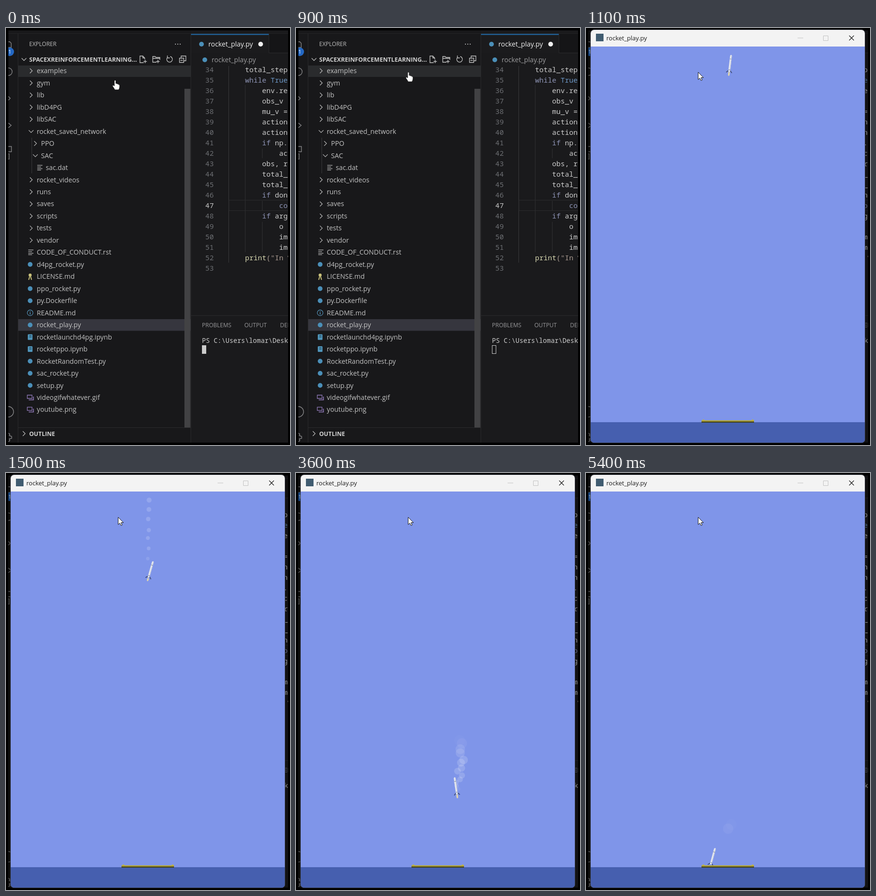
An HTML page that plays this animation: 600 by 878 pixels, repeating every 5500 ms.

```html
<!DOCTYPE html>
<html lang="en">
<head>
<meta charset="utf-8">
<title>Rocket landing</title>
<style>
html, body { margin: 0; width: 100%; height: 100%; overflow: hidden; background: #000; }
svg { display: block; width: 600px; height: 878px; }
text { font-family: "Open Sans", "Noto Sans", sans-serif; white-space: pre; }
.mono { font-family: "Noto Sans Mono", "DejaVu Sans Mono", monospace; }
</style>
</head>
<body>
<svg viewBox="0 0 600 878" xmlns="http://www.w3.org/2000/svg">
  <defs>
    <clipPath id="stage"><rect x="5" y="5" width="591" height="868"/></clipPath>
    <clipPath id="frame"><rect x="10" y="4" width="579" height="869" rx="7"/></clipPath>
  </defs>
  <rect width="600" height="878" fill="#000"/>
  <g id="ide" clip-path="url(#stage)"></g>
  <rect id="shade" x="5" y="5" width="591" height="868" fill="#000" opacity=".3"/>
  <g id="win">
    <rect x="9.5" y="3.5" width="580" height="870" rx="7" fill="none" stroke="#33363f"/>
    <g clip-path="url(#frame)">
      <rect id="bar" x="10" y="4" width="579" height="35.5" fill="#f3f3f3"/>
      <rect id="sky" x="10" y="39" width="579" height="834"/>
      <g id="scene">
        <rect x="10" y="830" width="579" height="43" fill="#465faf"/>
        <g id="puffs" fill="#fff"></g>
        <g id="rocket">
          <ellipse id="flame" cy="4.5" rx="1.8" ry="4" fill="#ecdca6"/>
          <path d="M-2-2L-6 2M2-2L6 2M-4-1H4" stroke="#3a4874" stroke-width="1.6" fill="none"/>
          <path d="M-2 0V-34L0-36L2-34V0Z" fill="#e3e6ee"/>
          <path d="M1.5-1V-34" stroke="#b9c1d8"/>
          <path d="M-2-4H2M-2-27H2" stroke="#7a84a0"/>
        </g>
        <rect x="244" y="826" width="111" height="3" fill="#b5a83a"/>
        <rect x="244" y="828.5" width="111" height="2.5" fill="#45441f"/>
        <path d="M245 826l3-2l3 2zM349 826l3-2l3 2z" fill="#c4b63c"/>
      </g>
    </g>
    <rect x="21" y="12" width="16" height="16" fill="#405c70"/>
    <text x="43" y="26" font-size="13.05" fill="#1c1c1c">rocket_play.py</text>
    <g fill="none">
      <path d="M447 21h12M501.500 16.500h10v10h-10z" stroke="#c2c2c2"/>
      <path d="M556 16l10 10M566 16l-10 10" stroke="#222" stroke-width="1.4"/>
    </g>
  </g>
  <path id="hand" d="M4 1.500Q4 0 5.500 0T7 1.500V7Q9 6 10 8Q12 7 12.500 9Q15 8.500 15 11V14Q15 17 13 20H5Q3 16 .5 13Q-.5 11 1.500 10.500L4 12Z" fill="#fff" stroke="#222" stroke-width=".8"/>
  <path id="arrow" d="M237 93V108.500L240.500 105.500L243 110.500L245.500 109.500L243 104.500H248Z" fill="#fff" stroke="#111"/>
</svg>
<script>
const $ = id => document.getElementById(id);
const ide = $("ide");

function add(parent, tag, attrs, text) {
  const el = document.createElementNS("http://www.w3.org/2000/svg", tag);
  for (const k in attrs) el.setAttribute(k, attrs[k]);
  if (text !== undefined) el.textContent = text;
  return parent.appendChild(el);
}
const box = (x, y, width, height, fill) => add(ide, "rect", { x, y, width, height, fill });
const dot = (cx, cy, r, fill) => add(ide, "circle", { cx, cy, r, fill });
const line = (d, stroke, w = 1) => add(ide, "path", { d, stroke, "stroke-width": w, fill: "none" });
const label = (x, y, s, size, fill, weight = 400) =>
  add(ide, "text", { x, y, "font-size": size, fill, "font-weight": weight }, s);
const mono = (x, y, s, size, fill) =>
  add(ide, "text", { x, y, "font-size": size, fill, class: "mono" }, s);
const chevron = (x, y, open) =>
  line(open ? `M${x - 5} ${y - 2.5}l5 5l5-5` : `M${x - 2.5} ${y - 5}l5 5l-5 5`, "#b8b8b8", 1.3);

// Panels
box(5, 5, 591, 868, "#18181a");
box(391, 5, 205, 868, "#1a1a1c");
box(391, 12, 205, 40, "#151517");
box(391, 12, 164, 41, "#1b1b1d");
line("M391 13.500H555", "#226fb0", 2);
line("M25.500 12V873M390.500 12V873M555.500 12V52M555 52.500H596M391 605.500H596M26 841.500H390", "#2b2b2d");
line("M5 11.500H596", "#242426");

// Activity bar
line("M5 29h3l3 3v9H5M5 84a8 8 0 0 1 0 16M5 144l4 4l-4 4M5 200l6 5l-6 5M5 249.500h6.500v11H5M5 265h1.500v11H5M5 797a11 11 0 0 1 0 22", "#858587", 1.4);
line("M5 853l3 2l-1 3l5 2v4l-5 1l1 4l-3 2", "#858587", 1.4);
dot(8, 50, 9, "#2468c4");
label(5, 54, "1", 10.5, "#fff");

// Explorer header
label(49, 38, "EXPLORER", 12, "#bdbdbd");
for (const x of [358, 363, 368]) dot(x, 34, 1.1, "#c8c8c8");

const hover = box(26, 79, 364, 24, "#2a2b2d");
box(26, 613, 364, 24.500, "#36363e");
box(377, 128, 12.500, 713, "#424244");
chevron(38, 66, true);
const title = label(49, 71, "", 12.56, "#cfcfcf", 700);
const tools = line("M291 73h-8V59h6l4 4v3M289 59v4h4M294 67v7M290.500 70.500h7" +
  "M318 72h-8V60h5l2 2h8v5M310 64h15M321 67v7M317.500 70.500h7" +
  "M341 62a6 6 0 1 0 6-2M341 58v5h5" +
  "M370 63v-4h10v10h-4M366.500 63.500h9v9h-9zM368.500 68h5", "#c8c8c8", 1.3);

// File tree: kind + name
const files = [
  ">examples", ">gym", ">lib", ">libD4PG", ">libSAC", "vrocket_saved_network", ">PPO", "vSAC", "=sac.dat",
  ">rocket_videos", ">runs", ">saves", ">scripts", ">tests", ">vendor", "=CODE_OF_CONDUCT.rst",
  "pd4pg_rocket.py", "lLICENSE.md", "pppo_rocket.py", "ppy.Dockerfile", "iREADME.md", "procket_play.py",
  "nrocketlaunchd4pg.ipynb", "nrocketppo.ipynb", "pRocketRandomTest.py", "psac_rocket.py", "psetup.py",
  "gvideogifwhatever.gif", "gyoutube.png"
];
const icons = {
  ">": (x, y) => chevron(x + 2, y, false),
  "v": (x, y) => chevron(x + 2, y, true),
  "=": (x, y) => line(`M${x - 4} ${y - 5}h11M${x - 4} ${y - 1.5}h8M${x - 4} ${y + 2}h11M${x - 4} ${y + 5}h8`, "#b4b4b4", 1.3),
  "p": (x, y) => dot(x, y, 5, "#4b8fb8"),
  "l": (x, y) => { dot(x, y - 3, 3.2, "#c9c17a"); line(`M${x - 1} ${y}l-2 7M${x + 1} ${y}l2 7`, "#c9c17a", 2); },
  "i": (x, y) => { line(`M${x - 6} ${y}a6 6 0 1 0 12 0a6 6 0 1 0-12 0`, "#5593b8", 1.2); line(`M${x} ${y - 3.5}v1.500M${x} ${y - 1}v4.500`, "#5593b8", 1.5); },
  "n": (x, y) => { box(x - 5, y - 6, 10, 12, "#4f93b8").setAttribute("rx", 1.5); line(`M${x - 2} ${y - 3}h5M${x - 2} ${y}h5`, "#23495c", 1.2); },
  "g": (x, y) => { line(`M${x - 6} ${y + 2}v-7h10v7z`, "#8f78b8", 1.3); line(`M${x - 3} ${y + 5}h10v-7`, "#8f78b8", 1.6); }
};
files.forEach((f, i) => {
  const y = 90.3 + i * 25.47;
  const deep = i === 8 ? 19 : i === 6 || i === 7 ? 9 : 0;
  icons[f[0]](51 + deep, y);
  label(65 + deep, y + 5, f.slice(1), 14.2, "#c3c3c3");
});
line("M54.500 231V306", "#3a3a3c");
chevron(38, 854, false);
label(49, 858.500, "OUTLINE", 12.4, "#d0d0d0", 700);

// Editor
dot(413, 34, 5, "#4b8fb8");
label(427.500, 39, "rocket_play.py", 14.3, "#f0f0f0");
dot(538, 34, 5, "#f0f0f0");
dot(420, 67, 5, "#4b8fb8");
label(434.500, 72, "rocket_play.py", 14.2, "#9c9c9e");
line("M470.500 80V494", "#3a3a3c");
line("M505.500 120V472M541.500 254V274M541.500 364V384M541.500 408V472", "#303032");
line("M596 362.500H471V384.500H596", "#2b2b2d");

// indent, keyword, rest
const code = [
  [0, "", "total_steps = 0"], [0, "while", " True:"], [1, "", "env.render()"], [1, "", "obs_v = "],
  [1, "", "mu_v = "], [1, "", "action = "], [1, "", "action = "], [1, "if", " np.isscalar"],
  [2, "", "action"], [1, "", "obs, reward"], [1, "", "total_reward"], [1, "", "total_steps"],
  [1, "if", " done:"], [2, "continue", ""], [1, "if", " args"], [2, "", "o = "],
  [2, "", "img"], [2, "", "img"], [0, "print", "(\"In %d"], [0, "", ""]
];
code.forEach(([depth, key, rest], i) => {
  const n = 34 + i, y = 93 + i * 22, x = 505 + depth * 36;
  mono(421, y, n, 15, n === 47 ? "#c8c8c8" : "#6c6e72");
  const special = key === "print" ? "#d6d6b0" : "#8d93b4";
  if (key) mono(x, y, key, 15, special);
  const tint = key === "while" ? "#6c96c4" : key === "print" ? "#a99a90" : "#cccccc";
  mono(x + key.length * 9, y, rest, 15, tint);
});

// Terminal
label(414, 630, "PROBLEMS", 12, "#98989a");
label(503.500, 630, "OUTPUT", 12, "#98989a");
label(579, 630, "DEBUG", 12, "#98989a");
mono(414, 663, "PS C:\\Users\\lomar\\Desktop", 13.8, "#cccccc");
const caret = add(ide, "rect", { x: 414.5, y: 668.5, width: 8, height: 17, stroke: "#cccccc" });

// Flight path: time, base x, base y, tilt
const path = [
  [1000, 303, 60, 4], [1500, 301, 220, 16], [2000, 308, 383, 4], [2500, 340, 523, -11], [3000, 348, 612, -12],
  [3600, 340, 676, -8], [4300, 319, 738, 5], [4800, 289, 787, 14], [5100, 263.500, 824, 16], [5500, 263.500, 824, 15]
];
function pose(t) {
  let i = 0;
  while (i < path.length - 2 && t >= path[i + 1][0]) i++;
  const a = path[i], b = path[i + 1], p = path[i - 1] || a, n = path[i + 2] || b;
  const h = b[0] - a[0], u = (t - a[0]) / h;
  return [1, 2, 3].map(c => {
    const flat = k => k >= path.length - 2;
    const m0 = flat(i) ? 0 : (b[c] - p[c]) / (b[0] - p[0]) * h;
    const m1 = flat(i + 1) ? (b[c] - a[c]) * .8 : (n[c] - a[c]) / (n[0] - a[0]) * h;
    return (2 * u ** 3 - 3 * u * u + 1) * a[c] + (u ** 3 - 2 * u * u + u) * m0 +
      (3 * u * u - 2 * u ** 3) * b[c] + (u ** 3 - u * u) * m1;
  });
}

const noise = k => { const s = Math.sin(k * 91.7 + 4.3) * 4758.5; return s - Math.floor(s); };
const clamp = v => Math.max(0, Math.min(1, v));
const show = (el, on) => el.setAttribute("visibility", on ? "visible" : "hidden");
const GAP = 56, LIFE = 800;
const puffs = Array.from({ length: 16 }, () => add($("puffs"), "circle", {}));

function smoke(t) {
  const last = Math.floor((t - 1040) / GAP);
  puffs.forEach((el, j) => {
    const k = last - j, born = 1040 + k * GAP, age = t - born;
    const live = k >= 0 && age < LIFE && born < 4700;
    show(el, live);
    if (!live) return;
    const [x, y] = pose(born);
    const power = .45 + .55 * clamp((born - 1300) / 500);
    el.setAttribute("cx", x + (noise(k) - .5) * 13 * power);
    el.setAttribute("cy", y + 4 - age * .04 + (noise(k + 50) - .5) * 6);
    el.setAttribute("r", 3 + age * .011 * power);
    el.setAttribute("opacity", .16 * clamp((age - 60) / 100) * clamp((LIFE - age) / 250));
  });
}

function draw(time) {
  const t = Math.floor((time % 5500) / 100) * 100;
  const opening = t === 1000, open = t > 1000;

  show(hover, t < 1000);
  show(tools, t < 1000);
  title.textContent = "SPACEXREINFORCEMENTLEARNING" + (t < 1000 ? "..." : "-MASTER");
  caret.setAttribute("fill", t < 800 ? "#cccccc" : "none");

  const u = clamp(t / 600), e = u * u * (3 - 2 * u);
  $("hand").setAttribute("transform", `translate(${225 + 7 * e} ${110 - 17 * e})`);
  show($("hand"), t < 1000);
  show($("arrow"), t >= 1000);

  show($("win"), t >= 1000);
  show($("shade"), open);
  $("win").setAttribute("transform", opening ? "translate(19.2 37.5) scale(.8826)" : "");
  $("bar").setAttribute("opacity", opening ? .13 : 1);
  $("sky").setAttribute("fill", opening ? "#fff" : "#7f95e9");
  $("sky").setAttribute("opacity", opening ? .25 : 1);
  $("scene").setAttribute("display", open ? "inline" : "none");

  if (open) {
    const [x, y, tilt] = pose(t);
    $("rocket").setAttribute("transform", `translate(${x} ${y}) rotate(${tilt})`);
    $("flame").setAttribute("ry", 3.5 + noise(t / 100));
    $("flame").setAttribute("opacity", t < 5000 ? .9 : 0);
    smoke(t);
  }
}

function tick() {
  draw(performance.now());
  requestAnimationFrame(tick);
}
tick();
</script>
</body>
</html>
```
